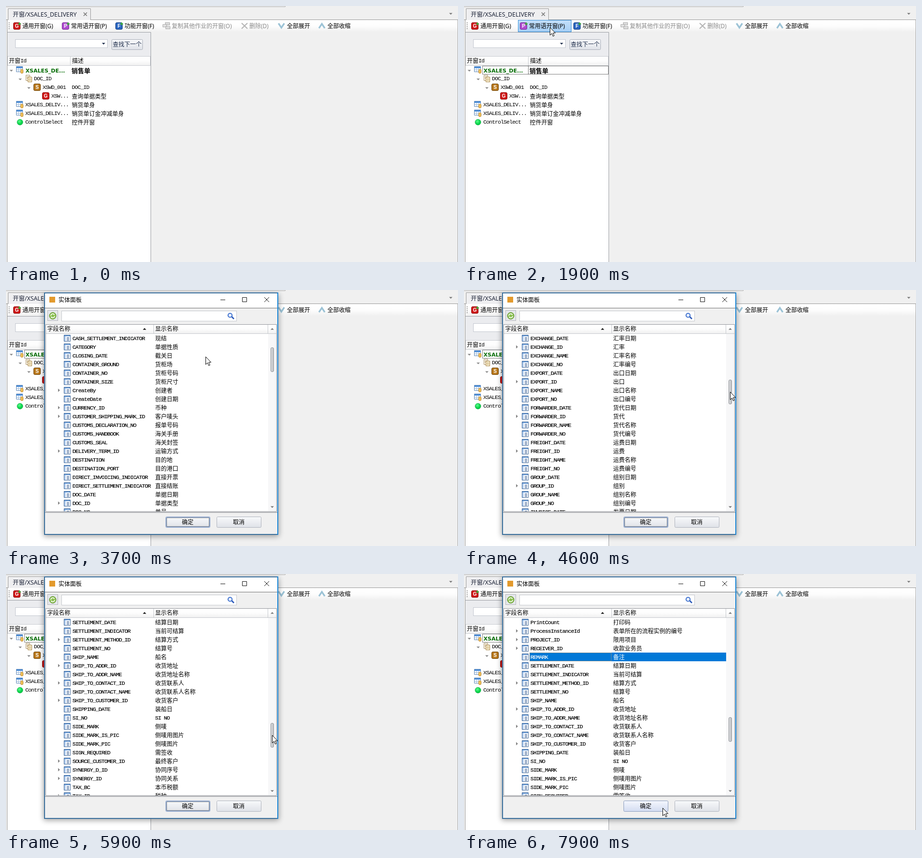
These frames come from a looping animation (938x531 px, 8 s). An HTML page:

```html
<!DOCTYPE html>
<html lang="zh-CN">
<head>
<meta charset="utf-8">
<style>
html, body { margin: 0; width: 100%; height: 100%; overflow: hidden; background: #f0f0f0; }
svg { display: block; width: 100%; height: 100%; }
text { font: 12px "Noto Sans", "Noto Sans CJK SC", "Noto Sans CJK", sans-serif; fill: #000; white-space: pre; }
.mono { font: 11.5px "Liberation Mono", monospace; letter-spacing: -.9px; }
#list .mono { stroke: currentColor; stroke-width: .2; }
.tab { font-size: 12.4px; fill: #1b2236; }
.off { fill: #8a8a8a; }
.navy { fill: #1b2a48; }
.entity { font: bold 11px "DejaVu Sans", sans-serif; fill: #006a00; }
.head { font-size: 13px; font-weight: bold; }
.badge { font: bold 10px "Liberation Sans", sans-serif; fill: #fff; text-anchor: middle; }
.mid { text-anchor: middle; }
.picked { color: #fff; }
.picked text { fill: #fff; }
.dots { fill: none; stroke: #000; stroke-dasharray: 1 1; }
</style>
</head>
<body>
<svg id="stage" viewBox="0 0 938 531">
  <defs>
    <linearGradient id="bar" x2="0" y2="1"><stop stop-color="#fff"/><stop offset=".5" stop-color="#fdfdfd"/><stop offset="1" stop-color="#f0f0f0"/></linearGradient>
    <linearGradient id="btn" x2="0" y2="1"><stop stop-color="#f8f9fb"/><stop offset="1" stop-color="#dfe2e8"/></linearGradient>
    <linearGradient id="btnHot" x2="0" y2="1"><stop stop-color="#f4f7fe"/><stop offset="1" stop-color="#d3dcf1"/></linearGradient>
    <linearGradient id="hot" x2="0" y2="1"><stop stop-color="#c3dffa"/><stop offset="1" stop-color="#a5cef5"/></linearGradient>
    <linearGradient id="grip"><stop stop-color="#dddee0"/><stop offset="1" stop-color="#bbbdc0"/></linearGradient>
    <radialGradient id="ball" cx=".4" cy=".35"><stop stop-color="#5dff8b"/><stop offset="1" stop-color="#00cf45"/></radialGradient>
    <filter id="soft" x="-10%" y="-10%" width="120%" height="120%"><feGaussianBlur stdDeviation="6"/></filter>
    <clipPath id="listClip"><path d="M82 91H544V459H82Z"/></clipPath>
    <g id="grid">
      <path d="M.5 .5H13.5V11.5H.5Z" fill="#fff" stroke="#5e87b8"/>
      <path d="M1 1H13V4H1Z" fill="#4f8fd8"/>
      <path d="M1 7.5H13M5.5 4V11M9.5 4V11" stroke="#9bb8da"/>
    </g>
    <g id="sheet">
      <use href="#grid"/>
      <rect x="9.5" y="6.5" width="5" height="8" rx="2" fill="#f2c45c" stroke="#b27a22"/>
    </g>
    <g id="doc">
      <path d="M.5 .5H8.5V11.5H.5Z" fill="#fffdf5" stroke="#a58a5a"/>
      <path d="M2 3.5H7M2 5.5H7M2 7.5H7" stroke="#c0aa80"/>
      <path d="M4.5 4.5H12.5V14.5H4.5Z" fill="#fff6df" stroke="#a5803e"/>
      <path d="M6 7.5H11M6 9.5H11M6 11.5H11" stroke="#c9a968"/>
    </g>
    <g id="field">
      <path d="M.5 .5H13.5V13.5H.5Z" fill="#fff" stroke="#456a98"/>
      <path d="M1 1H13V3H1Z" fill="#6b9cd6"/><path d="M1 3H4V13H1Z" fill="#b4cff0"/>
      <path d="M6 5.5H11M6 7.5H11M6 9.5H11M6 11.5H11" stroke="#4a6c9c"/>
    </g>
    <path id="down" d="M-3.5 -1.5H3.5L0 2Z"/>
    <path id="up" d="M-3.5 1.5H3.5L0 -2Z"/>
    <path id="right" d="M-2 -3.5V3.5L2 0Z"/>
  </defs>
  <g id="main"></g>
  <g id="dialog"></g>
  <g id="ghost">
    <path d="M82 124H300V142H82Z" fill="#8fc48f" opacity=".28"/>
    <path d="M190 98H251V84" fill="none" stroke="#777" stroke-width="2" opacity=".75"/>
  </g>
  <path id="cursor" d="M.5 .5V16.5L4.2 13 6.7 18.8 9.2 17.7 6.7 12H11.5Z" fill="#fff" stroke="#000"/>
</svg>
<script>
const $ = id => document.getElementById(id);
const show = (id, on) => $(id).setAttribute('display', on ? 'inline' : 'none');

const text = (x, y, s, cls) =>
  `<text x="${x}" y="${y}" class="${cls ?? (/^[ -~]+$/.test(s) ? 'mono' : '')}">${s}</text>`;
const box = (x, y, w, h, fill, extra = '') =>
  `<rect x="${x}" y="${y}" width="${w}" height="${h}" fill="${fill}" ${extra}/>`;
const frame = (x, y, w, h, fill, line, extra = '') =>
  box(x + .5, y + .5, w - 1, h - 1, fill, `stroke="${line}" ${extra}`);
const line = (d, color, width = 1) => `<path d="${d}" fill="none" stroke="${color}" stroke-width="${width}"/>`;
const icon = (id, x, y, fill = '#000') => `<use href="#${id}" x="${x}" y="${y}" fill="${fill}"/>`;
const badge = (x, y, letter, fill, edge) =>
  frame(x, y, 15, 15, fill, edge, 'rx="2.5"') + text(x + 7.5, y + 11, letter, 'badge');
const plus = (x, y) => line(`M${x - 3} ${y}H${x + 3}M${x} ${y - 3}V${y + 3}`, '#3fae3f', 2);

function mainWindow() {
  const tree = [
    ['', '销售单'], ['DOC_ID', '', 58], ['XSWD_001', 'DOC_ID', 76], ['XSW...', '查询单据类型', 94],
    ['XSALES_DELIV...', '销货单身', 40], ['XSALES_DELIV...', '销货单订金冲减单身', 40], ['ControlSelect', '控件开窗', 40],
  ];
  return box(0, 0, 938, 531, '#f0f0f0') +
    box(0, 0, 580, 1, '#f8f8f8') + line('M0 1.5H579.5V0', '#a9a9a9') +
    line('M0 28.5H938', '#999') +
    box(3, 29, 934, 25, 'url(#bar)') +
    `<path d="M4.5 29V5.5H175.5V29" fill="#efeff1" stroke="#9a9a9a"/>` +
    text(14, 22, '开窗/XSALES_DELIVERY', 'tab') +
    line('M161 13.5L168 20.5M168 13.5L161 20.5', '#777', 1.6) +
    icon('down', 923, 16, '#777') +
    line('M937.5 29V531', '#aaa') + line('M2.5 29V531', '#999') +
    `<path d="M6.5 34V49" stroke="#999" stroke-width="2" stroke-dasharray="2 2"/>` +
    `<g id="toolHot">${frame(112, 29, 111, 25, 'url(#hot)', '#3790d8')}</g>` +
    badge(15, 34, 'G', '#cf1717', '#8d0a0a') + plus(28, 37) + text(34, 46, '通用开窗(G)') +
    badge(116, 34, 'P', '#b04fd0', '#702590') + plus(129, 37) + text(135, 46, '常用语开窗(P)') +
    badge(227, 34, 'F', '#2b66c0', '#133c80') + plus(240, 37) + text(246, 46, '功能开窗(F)') +
    frame(330, 34, 10, 6, '#ddd', '#aaa') + frame(325, 38, 9, 6, '#e4e4e4', '#aaa') + frame(331, 42, 10, 6, '#ddd', '#aaa') +
    text(344, 46, '复制其他作业的开窗(O)', 'off') +
    line('M489 35.5L501 47M501 35.5L489 47', '#b5b5b5', 2.2) + text(505, 46, '删除(D)', 'off') +
    line('M565.5 36L571.5 45L577.5 36', '#9cc3d6', 3.4) + text(583, 46, '全部展开') +
    line('M649.5 46L655.5 37L661.5 46', '#9cc3d6', 3.4) + text(667, 46, '全部收缩') +
    box(3, 55, 297, 49, '#ebecef') + box(3, 123, 297, 408, '#fff') +
    line('M2 54.5H300.5V531', '#9a9da3') +
    frame(19, 69, 192, 18, '#fff', '#c3c7cf') + icon('down', 202.5, 78, '#1b2a48') +
    frame(219, 69, 65, 22, 'url(#btn)', '#a9aeb8', 'rx="2" id="find"') + text(221.5, 84, '查找下一个', 'navy') +
    frame(3, 104, 297, 20, 'url(#bar)', '#c9ccd1') + line('M133.5 105V123', '#c9ccd1') +
    text(6, 118, '开窗') + text(30, 117, 'Id') + text(137, 118, '描述') +
    tree.map(([name, label, x], i) => {
      const y = 137 + 18 * i;
      return (name && text(x, y - 1, name)) + (label && i && text(136.5, y - (label < 'a' ? 1 : -.5), label));
    }).join('') +
    text(40.5, 138, 'XSALES_DE...', 'entity') + text(136, 138.5, '销售单', 'head') +
    [[11, 134], [29.5, 152], [47.5, 170]].map(p => icon('down', ...p, '#888')).join('') +
    [125, 197, 215].map(y => icon('sheet', 21, y)).join('') + icon('doc', 41, 143) +
    badge(57, 161, 'S', '#b9781c', '#6d430a') + badge(75, 179, 'G', '#d01616', '#8d0a0a') +
    `<circle cx="29" cy="241" r="6" fill="url(#ball)" stroke="#17a844" stroke-width=".8"/>` +
    `<path id="focus" class="dots" d="M38.5 124.5H299.5V141.5H38.5ZM133.5 124V141"/>`;
}

// Field list: "name label" per line, with a generated middle section.
const top33 = `XSALES_DELIVERY 销售单
ADVANCED_DELIVERY 允许早交
ALL_SYNERGY 整单协同
AMOUNT_UNINCLUDE_TAX_BC 本币未税金额
AMOUNT_UNINCLUDE_TAX_OC 原币未税金额
ApproveBy 修改人
ApproveDate 修改日期
ApproveStatus 单据状态属性
Attachments 附件
BANK_ACCOUNT_ID 银行账号
BL_CONTENT 提单内容
BROKERS_SUPPLIER_ID 报关行
CASH_SETTLEMENT_INDICATOR 现结
CATEGORY 单据性质
CLOSING_DATE 截关日
CONTAINER_GROUND 货柜场
CONTAINER_NO 货柜号码
CONTAINER_SIZE 货柜尺寸
CreateBy 创建者
CreateDate 创建日期
CURRENCY_ID 币种
CUSTOMER_SHIPPING_MARK_ID 客户唛头
CUSTOMS_DECLARATION_NO 报单号码
CUSTOMS_HANDBOOK 海关手册
CUSTOMS_SEAL 海关封签
DELIVERY_TERM_ID 运输方式
DESTINATION 目的地
DESTINATION_PORT 目的港口
DIRECT_INVOICING_INDICATOR 直接开票
DIRECT_SETTLEMENT_INDICATOR 直接结账
DOC_DATE 单据日期
DOC_ID 单据类型
DOC_NO 单号`;
const tail = `PrintCount 打印码
ProcessInstanceId 表单所在的流程实例的编号
PROJECT_ID 限用项目
RECEIVER_ID 收款业务员
REMARK 备注
SETTLEMENT_DATE 结算日期
SETTLEMENT_INDICATOR 当前可结算
SETTLEMENT_METHOD_ID 结算方式
SETTLEMENT_NO 结算号
SHIP_NAME 船名
SHIP_TO_ADDR_ID 收货地址
SHIP_TO_ADDR_NAME 收货地址名称
SHIP_TO_CONTACT_ID 收货联系人
SHIP_TO_CONTACT_NAME 收货联系人名称
SHIP_TO_CUSTOMER_ID 收货客户
SHIPPING_DATE 装船日
SI_NO SI NO
SIDE_MARK 侧唛
SIDE_MARK_IS_PIC 侧唛用图片
SIDE_MARK_PIC 侧唛图片
SIGN_REQUIRED 需签收
SOURCE_CUSTOMER_ID 最终客户
SYNERGY_D_ID 协同序号
SYNERGY_ID 协同关系
TAX_BC 本币税额
TAX_ID 税种
TAX_OC 原币税额
TAX_RATE 税率`;
const stems = 'DRIVER司机 EMPLOYEE业务员 EXCHANGE汇率 EXPORT出口 FORWARDER货代 FREIGHT运费 GROUP组别 INVOICE发票 LOADING装货 NOTIFY通知 ORDER订单 OWNER所属 PAYMENT付款 PORT港口';
const middle = stems.split(' ').flatMap(s => {
  const [, en, zh] = s.match(/^([A-Z]+)(.+)$/);
  return ['DATE 日期', 'ID ', 'NAME 名称', 'NO 编号'].map(e => `${en}_${e.replace(' ', ' ' + zh)}`);
});
const fields = [...top33.split('\n'), ...middle, ...tail.split('\n')].map(s => s.match(/^(\S+) (.+)$/).slice(1));
const PICK = fields.findIndex(f => f[0] === 'REMARK');

function fieldRow([name, label], i) {
  const y = 100 + 18 * i, x = i ? 120 : 102;
  const mark = i ? (/(_ID|Id|By)$/.test(name) ? icon('right', 110, y, '#888') : '') : icon('down', 92, y, '#888');
  const back = i ? '' : box(306, 91, 238, 18, '#f4f4f4');
  const pick = i === PICK
    ? `<g id="pick">${box(136, y - 9, 408, 18, '#0078d7')}<path d="M136.5 ${y - 8.5}H305.5V${y + 8.5}H136.5Z" fill="none" stroke="#f0a050" stroke-dasharray="1 1"/></g>` : '';
  return `<g ${i === PICK ? 'id="pickRow"' : ''}>${back}${pick}${mark}${icon('field', x, y - 7)}` +
    text(x + 18, y + 4, name) + text(309.5, y + (label < 'a' ? 4 : 4.5), label) + '</g>';
}

function dialogWindow() {
  return box(78, 9, 488, 502, '#000', 'opacity=".36" filter="url(#soft)"') +
    box(80, 6, 484, 501, '#f0f0f0') + box(80, 6, 484, 31, '#fff') +
    line('M81 37.5H564', '#707070') +
    box(90, 14, 12, 12, '#e39a2d') + text(109, 24.5, '实体面板') +
    line('M445 20.5H455M490.5 15.5H499.5V24.5H490.5ZM536 15L546 25M546 15L536 25', '#111') +
    frame(86, 42, 22, 22, '#e6e8ec', '#b2b5ba') +
    `<circle cx="97" cy="53.5" r="7" fill="#8cc152" stroke="#5f8f2e"/>` +
    line('M93 53.5A4 4 0 0 1 100.5 51.5M101 54A4 4 0 0 1 93.5 55.5', '#fff', 1.6) +
    frame(115, 43, 364, 22, '#fff', '#c6c9ce') +
    line('M468.5 55.5L473 60', '#2b59b8', 2.6) + `<circle cx="465" cy="52.5" r="4.2" fill="#e8f1ff" stroke="#2b62c9" stroke-width="1.8"/>` +
    frame(82, 71, 480, 389, '#fff', '#94979d') +
    box(83, 72, 478, 18, 'url(#bar)') + line('M83 90.5H561M306.5 72V90M543.5 72V90', '#c6c9ce') +
    text(85.5, 85, '字段名称') + text(309.5, 85, '显示名称') + icon('up', 287.5, 81) +
    box(544, 91, 17, 368, '#f7f7f8') + icon('up', 552.5, 81, '#777') + icon('down', 552.5, 450, '#777') +
    frame(549, 0, 7, 51, 'url(#grip)', '#9497 9b'.replace(' ', ''), 'rx="2.5" id="thumb"') +
    `<g clip-path="url(#listClip)"><g id="list">${fields.map(fieldRow).join('')}</g></g>` +
    line('M81 461.5H564', '#808389') +
    frame(331, 470, 93, 23, 'url(#btn)', '#8a9cbd', 'rx="2" id="ok"') +
    `<g id="okFocus">${frame(332, 471, 91, 21, 'none', '#9fbfee')}<path class="dots" d="M333.5 472.5H421.5V490.5H333.5Z"/></g>` +
    text(377, 486, '确定', 'mid') +
    frame(437, 470, 93, 23, 'url(#btn)', '#aeb3bd', 'rx="2"') + text(483, 486, '取消', 'mid') +
    line('M564 6H80V507H564', '#3a6f9c', 2) + line('M564 5V508', '#1a86d6', 2);
}

$('main').innerHTML = mainWindow();
$('dialog').innerHTML = dialogWindow();

// Keys are [time, value, ...].
const path = [
  [200, 314, 156], [400, 180, 136], [600, 60, 117], [700, 34, 118], [900, 56, 134], [1100, 56, 134],
  [1300, 110, 118], [1500, 236, 84], [1600, 230, 68], [1800, 186, 47], [1900, 178, 44], [2600, 178, 44],
  [3100, 243, 222], [3500, 243, 222], [3600, 310, 180], [3700, 414, 138], [3900, 510, 122], [4200, 553, 145],
  [4300, 553, 145], [4400, 553, 152], [5000, 549, 329], [5200, 551, 333], [5400, 551, 333], [5700, 552, 339],
  [5800, 552, 339], [5900, 552, 334], [6300, 552, 326], [6400, 552, 326], [7000, 156, 169], [7200, 156, 169],
  [7700, 405, 488], [7900, 412, 485],
];
const scroll = [
  [3100, 0], [3500, 12], [4300, 12], [4400, 15], [4700, 54], [5000, 90], [5200, 92],
  [5400, 92], [5700, 96], [5800, 96], [5900, 94], [6300, 89],
];
const opening = [[2100, .9, .15], [2200, .95, .5], [2300, .984, .8], [2400, .994, .94], [2500, 1, 1]];

function at(keys, t) {
  const n = keys.findIndex(k => k[0] > t);
  if (n === 0) return keys[0].slice(1);
  if (n < 0) return keys[keys.length - 1].slice(1);
  const a = keys[n - 1], b = keys[n], p = (t - a[0]) / (b[0] - a[0]);
  return a.slice(1).map((v, i) => v + (b[i + 1] - v) * p);
}

function draw(now) {
  const t = Math.floor(now % 8000 / 100) * 100;
  const [x, y] = at(path, t).map(Math.round);
  const over = (l, u, r, d) => x >= l && x < r && y >= u && y < d;
  const first = Math.round(at(scroll, t)[0]);
  const [size, alpha] = at(opening, t);
  const open = t >= 2100, picked = t >= 7200;

  show('cursor', t >= 200);
  $('cursor').setAttribute('transform', `translate(${x} ${y})`);
  show('focus', t >= 900);
  show('toolHot', !open && over(112, 29, 223, 54));
  $('find').setAttribute('fill', !open && over(219, 69, 284, 91) ? 'url(#btnHot)' : 'url(#btn)');

  show('dialog', open);
  $('dialog').setAttribute('opacity', alpha);
  $('dialog').setAttribute('transform', `translate(322 256) scale(${size}) translate(-322 -256)`);
  show('ghost', t >= 2200 && t < 2500);
  $('list').setAttribute('transform', `translate(0 ${-18 * first})`);
  $('thumb').setAttribute('y', Math.round(91 + first * 2.32) + .5);
  show('pick', picked);
  $('pickRow').setAttribute('class', picked ? 'picked' : '');
  show('okFocus', !picked);
  $('ok').setAttribute('fill', over(331, 470, 424, 493) ? 'url(#btnHot)' : 'url(#btn)');
}

const start = performance.now();
function tick() {
  draw(performance.now() - start);
  requestAnimationFrame(tick);
}
tick();
</script>
</body>
</html>
```
